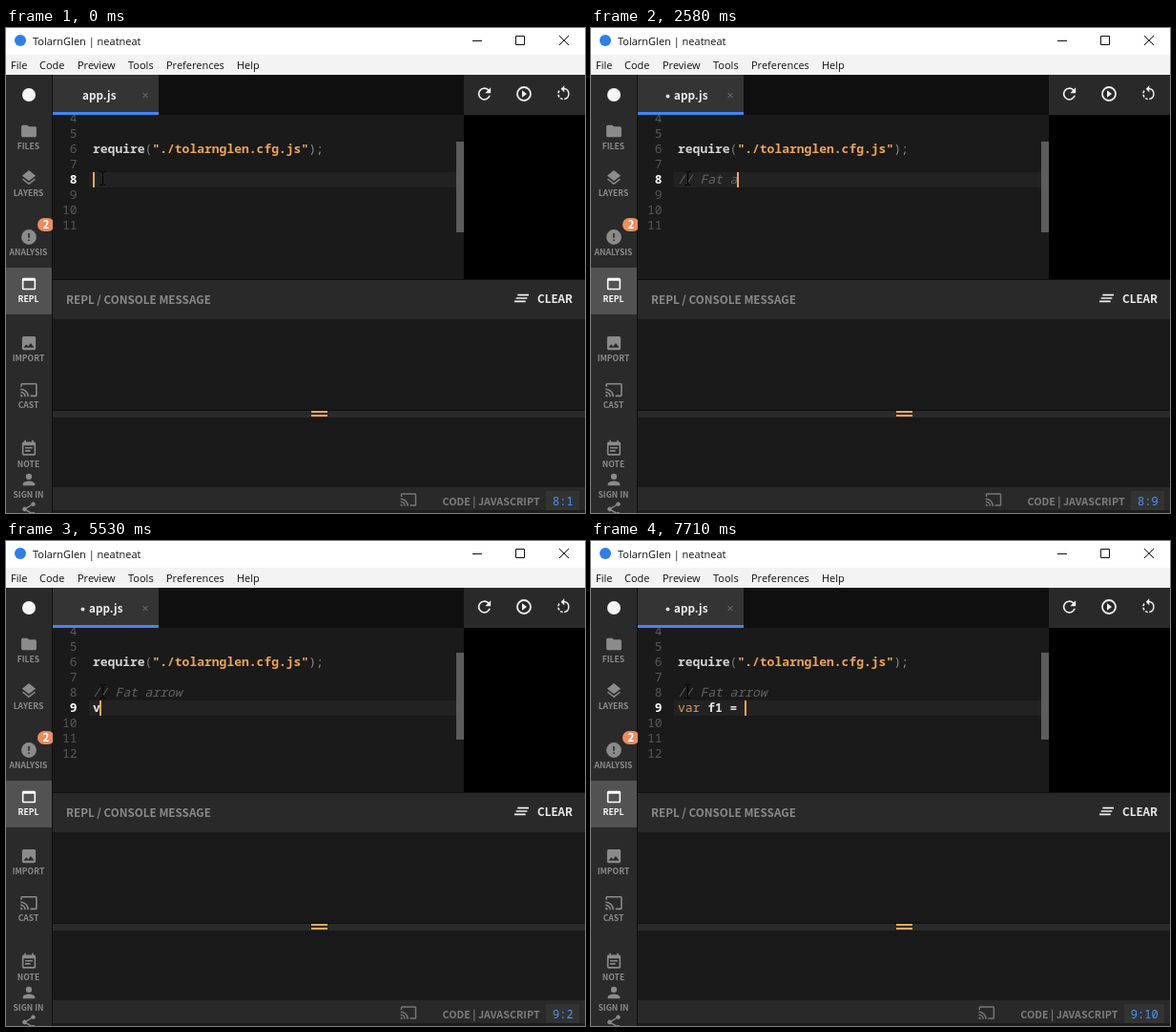
An HTML page that plays this animation: 607x508 px, repeating every 8 s.

```html
<!DOCTYPE html>
<html lang="en">
<head>
<meta charset="utf-8">
<title>Code editor</title>
<style>
html, body { margin: 0; width: 100%; height: 100%; overflow: hidden; background: #191919; }
svg { display: block; overflow: hidden; }
text { white-space: pre; }
.sys { font: 11px "Open Sans", "Noto Sans", sans-serif; fill: #111; }
.ui { font: 700 11.7px "Noto Sans CJK JP", "Noto Sans CJK SC", "Open Sans", sans-serif; }
.small { font-size: 8.6px; }
.code { font: 13px "Noto Sans Mono", "Liberation Mono", monospace; }
.list { font: 500 12px "Noto Sans Mono", "Liberation Mono", monospace; }
.note { font-size: 10.8px; }
.i { font-style: italic; }
.b { font-weight: 600; }
.mid { text-anchor: middle; }
.end { text-anchor: end; }
.shadow { filter: drop-shadow(0 18px 15px #0008); }
</style>
</head>
<body>
<svg id="stage" width="607" height="508" viewBox="0 0 607 508"></svg>
<script>
const LOOP = 8000, BLINK = 535, CHAR = 7.8, LEFT = 91;

// time, text of the edited line, autocomplete query (if the list is open)
const STEPS = [
  [-125, ""], [1060, "/"], [1270, "//"], [1490, "// "], [1700, "// F"],
  [1820, "// F", "f"], [1920, "// Fa", "f"], [2030, "// Fa", "fa"],
  [2150, "// Fat", "fa"], [2260, "// Fat", "fat"], [2370, "// Fat "],
  [2580, "// Fat a"], [2690, "// Fat a", "a"], [2800, "// Fat ar", "a"],
  [2920, "// Fat arr", "ar"], [3020, "// Fat arr", "arr"], [3130, "// Fat arro", "arr"],
  [3240, "// Fat arrow"], [3350, "// Fat arrow "],
  [3560, "// "], [4980, "/"], [5080, ""],
  [5530, "v"], [5640, "v", "v"], [5750, "va", "va"], [5860, "var", "var"],
  [5970, "var ", "var"], [6070, "var "], [6310, "var f"], [6410, "var f", "f"],
  [6640, "var f1", "f"], [6750, "var f1"], [7070, "var f1 "],
  [7500, "var f1 ="], [7710, "var f1 = "]
];
const NEWLINE = 3560, DIRTY = 1490;

// name, type, parameters
const FN = "function";
const ITEMS = [
  ["alert", FN, "(message:string) => void"],
  ["BackgroundLayer", "[class: BackgroundLayer]"],
  ["Tolarn", "[class: Tolarn]"],
  ["Layer", "[class: Layer]"],
  ["VideoLayer", "[class: VideoLayer]"],
  ["cancelAnimationFrame", FN, "(handle:number) => void"],
  ["clearTimeout", FN, "(handle:number) => void"],
  ["clearInterval", FN, "(handle:number) => void"],
  ["declare", "[flowtype: declare]"],
  ["localStorage", "Storage"],
  ["navigator", "Navigator"],
  ["parseFloat", FN, "(value:string) => number"],
  ["requestAnimationFrame", FN, "(callback:any) => number"],
  ["focus", FN, "() => void"],
  ["Infinity", "number"],
  ["isFinite", FN, "(value:number) => boolean"]
];

const ICONS = {
  folder: "M10 4H4c-1.1 0-2 .9-2 2v12c0 1.1.9 2 2 2h16c1.1 0 2-.9 2-2V8c0-1.1-.9-2-2-2h-8z",
  layers: "M12 18.5l-7.4-5.7L3 14l9 7 9-7-1.6-1.2zM12 16l9-7-9-7-9 7z",
  alert: "M12 2a10 10 0 1 0 0 20a10 10 0 0 0 0-20zm1 15h-2v-2h2zm0-4h-2V7h2z",
  panel: "M19 4H5a2 2 0 0 0-2 2v12a2 2 0 0 0 2 2h14a2 2 0 0 0 2-2V6a2 2 0 0 0-2-2zm0 14H5V8h14z",
  image: "M21 19V5a2 2 0 0 0-2-2H5a2 2 0 0 0-2 2v14a2 2 0 0 0 2 2h14a2 2 0 0 0 2-2zM8.5 13.5l2.5 3 3.5-4.5 4.5 6H5z",
  cast: "M21 3H3a2 2 0 0 0-2 2v3h2V5h18v14h-7v2h7a2 2 0 0 0 2-2V5a2 2 0 0 0-2-2zM1 18v3h3a3 3 0 0 0-3-3zm0-4v2a5 5 0 0 1 5 5h2a7 7 0 0 0-7-7zm0-4v2a9 9 0 0 1 9 9h2A11 11 0 0 0 1 10z",
  note: "M17 10H7v2h10zm2-7h-1V1h-2v2H8V1H6v2H5a2 2 0 0 0-2 2v14a2 2 0 0 0 2 2h14a2 2 0 0 0 2-2V5a2 2 0 0 0-2-2zm0 16H5V8h14zm-5-5H7v2h7z",
  person: "M12 12a4 4 0 1 0 0-8 4 4 0 0 0 0 8zm0 2c-2.7 0-8 1.3-8 4v2h16v-2c0-2.7-5.3-4-8-4z",
  share: "M18 16c-.8 0-1.4.3-2 .8l-7.1-4.2a3 3 0 0 0 0-1.4L16 7.1A3 3 0 1 0 15 5c0 .2 0 .5.1.7L8 9.8a3 3 0 1 0 0 4.4l7.1 4.2A2.9 2.9 0 1 0 18 16z",
  refresh: "M17.6 6.4A8 8 0 1 0 19.7 14h-2.1A6 6 0 1 1 16.2 7.8L13 11h7V4z",
  rotate: "M7.1 8.5L5.7 7.1A8 8 0 0 0 4.1 11h2a6 6 0 0 1 1-2.5zM6.1 13h-2a8 8 0 0 0 1.6 3.9l1.4-1.4a6 6 0 0 1-1-2.5zm1 5.3a8 8 0 0 0 3.9 1.6v-2a6 6 0 0 1-2.5-1zM13 4.1V1L8.5 5.5 13 10V6.1a6 6 0 0 1 0 11.8v2a8 8 0 0 0 0-15.8z",
  clear: "M5 13h14v-2H5zm-2 4h14v-2H3zM7 7v2h14V7z"
};

const rect = (x, y, w, h, fill, r = 0) =>
  `<rect x="${x}" y="${y}" width="${w}" height="${h}" fill="${fill}" rx="${r}"/>`;
const text = (x, y, cls, str, fill = "") =>
  `<text x="${x}" y="${y}" class="${cls}" ${fill && `fill="${fill}"`}>${str}</text>`;
const span = (str, fill, weight) =>
  `<tspan fill="${fill}" ${weight ? `font-weight="${weight}"` : ""}>${str}</tspan>`;
const line = (d, color, width = 1) =>
  `<path d="${d}" fill="none" stroke="${color}" stroke-width="${width}"/>`;
const icon = (name, cx, cy, size, fill) =>
  `<path d="${ICONS[name]}" fill="${fill}" fill-rule="evenodd"
    transform="translate(${cx - size / 2} ${cy - size / 2}) scale(${size / 24})"/>`;

function windowFrame() {
  const menu = [["File", 5], ["Code", 35], ["Preview", 75], ["Tools", 128], ["Preferences", 168], ["Help", 242]];
  return rect(0, 0, 607, 28, "#fff") + rect(0, 28, 607, 21, "#f3f3f3") +
    `<circle cx="15" cy="13" r="6" fill="#2f7fe6"/>` +
    text(28, 17.5, "sys", "TolarnGlen | neatneat") +
    menu.map(([name, x]) => text(x, 43, "sys", name)).join("") +
    line("M489 13.5h10M534.5 8.5h9v9h-9zM580 8l10 10M590 8l-10 10", "#111");
}

function sidebar() {
  const entries = [["folder", "FILES", 108], ["layers", "LAYERS", 157], ["alert", "ANALYSIS", 219],
    ["panel", "REPL", 268], ["image", "IMPORT", 330], ["cast", "CAST", 379],
    ["note", "NOTE", 440.5], ["person", "SIGN IN", 473]];
  return rect(0, 49, 48, 459, "#2a2a2a") + rect(0, 251, 48, 49, "#525252") +
    `<circle cx="24" cy="70" r="7" fill="#f5f5f5"/>` +
    entries.map(([name, label, y]) => {
      const fill = label == "REPL" ? "#fff" : "#8b8b8b";
      return icon(name, 24, y, 19, fill) + text(23.5, y + 19.3, "ui small mid", label, fill);
    }).join("") +
    icon("share", 24, 504, 18, "#8b8b8b") +
    rect(33, 199, 18, 14, "#ea8d63", 7) + text(42, 210, "ui mid", "2", "#fff");
}

function panels() {
  return rect(48, 49, 559, 459, "#0f0f0f") + rect(49, 49, 111, 42, "#343434") +
    rect(49, 88, 111, 3, "#4285f4") + line("M143.5 68l5 5M148.5 68l-5 5", "#777") +
    rect(480, 49, 127, 42, "#292929") + rect(480, 91, 127, 172, "#000") +
    icon("refresh", 501.5, 69, 20, "#f0f0f0") + icon("rotate", 584.5, 69, 19, "#f0f0f0") +
    `<circle cx="543" cy="69" r="7" fill="none" stroke="#f0f0f0" stroke-width="1.8"/>` +
    `<path d="M541 65.3v7.4l5-3.7z" fill="#f0f0f0"/>` +
    rect(49, 264, 558, 41, "#292929") + rect(49, 305, 558, 95, "#191919") +
    rect(49, 401, 558, 7, "#2a2a2a") + rect(49, 408, 558, 73, "#191919") +
    text(63, 289, "ui", "REPL / CONSOLE MESSAGE", "#8a8a8a") +
    icon("clear", 540.5, 283, 20, "#f0f0f0") + text(557, 288, "ui", "CLEAR", "#ececec") +
    rect(320, 401, 17, 2, "#eda85f") + rect(320, 405, 17, 2, "#eda85f") +
    rect(49, 481, 558, 24, "#292929") + rect(49, 505, 558, 3, "#1d1b1c");
}

// Positions of the tightest in-order match of query in name, or null
function match(name, query) {
  const low = name.toLowerCase();
  let best = null;
  for (let start = 0; start < low.length; start++) {
    if (low[start] != query[0]) continue;
    const hits = [start];
    for (const c of query.slice(1)) {
      const at = low.indexOf(c, hits[hits.length - 1] + 1);
      if (at < 0) { hits.length = 0; break; }
      hits.push(at);
    }
    const size = h => h[h.length - 1] - h[0];
    if (hits.length && (!best || size(hits) < size(best))) best = hits;
  }
  return best;
}

function popup(query, x, y) {
  const rows = ITEMS.map(item => [item, match(item[0], query)]).filter(row => row[1]);
  const full = rows.length * 28, height = Math.min(full, 320);
  const right = full > height ? 465 : 473;
  const body = rows.map(([[name, type, params = ""], hits], i) => {
    const first = i == 0, base = i * 28 + 18.3;
    const label = [...name].map((c, k) => span(c, hits.includes(k) ? "#f2b632" : "#f0f0f0")).join("");
    const tint = type == FN ? "#f5b01e" : first ? "#f4f7ff" : "#80a8f5";
    return (first ? rect(0, 0, 480, 28, "#2962ff") : "") +
      text(7.5, base, "list b", label) +
      text(10.5 + name.length * 7.2, base, "list note", params, first ? "#a4c1ff" : "#80a8f5") +
      text(right, base, first && type != FN ? "list b end" : "list end", type, tint);
  }).join("");
  return `<g class="shadow"><svg x="${x}" y="${y}" width="480" height="${height}">` +
    rect(0, 0, 480, height, "#252525") + body + `</svg></g>`;
}

function codeLine(str, y) {
  if (str.startsWith("/")) return text(LEFT, y, "code i", str, "#626262");
  const isVar = str.startsWith("var");
  return text(LEFT, y, "code b", isVar ? span("var", "#dd9a58", 400) + str.slice(3) : str, "#e4e4e4");
}

function editor(t, str, caret) {
  const below = t >= NEWLINE, row = below ? 9 : 8;
  const base = n => 131 + (n - 6) * 16, top = base(row) + 4 - 16;
  let out = rect(49, 91, 431, 172, "#1a1a1a") + rect(87, top, 385, 16, "#222");
  for (let n = 4; n <= row + 3; n++)
    out += text(74.5, base(n), "code end" + (n == row ? " b" : ""), n, n == row ? "#fff" : "#585858");
  out += text(LEFT, base(6), "code b", span("require", "#d4d4d4") + span("(", "#777", 400) +
    span('"./tolarnglen.cfg.js"', "#e9a55d") + span(");", "#888", 400));
  if (t >= 5970 && t < 6070) out += rect(LEFT, top, 24, 16, "#3d3d3d");
  if (below) out += codeLine("// Fat arrow", base(8));
  out += codeLine(str, base(row));
  if (caret) out += rect(Math.floor(LEFT + str.length * CHAR), top, 2, 16, "#f2a65a");
  out += below ? rect(472, 117, 8, 91, "#5c5c5c") : rect(472, 119, 8, 95, "#5c5c5c");
  return `<svg y="91" width="480" height="172" viewBox="0 91 480 172">${out}</svg>`;
}

function status(label) {
  const x = 594.6 - label.length * 7.2;
  return icon("cast", x - 151, 494, 18, "#777") +
    text(x - 13.3, 500, "ui note end", "CODE | JAVASCRIPT", "#7c7c7c") +
    rect(x - 7, 485, 608 - x, 20, "#333") + text(x, 500, "list", label, "#4b96fb");
}

function dynamic(t, [, str, query], caret) {
  const row = t >= NEWLINE ? 9 : 8;
  const lag = t >= 5970 && t < 6070 ? 0 : 1;
  const word = str.trimEnd().search(/\w+$/);
  return (t >= DIRTY
      ? `<circle cx="80.5" cy="71.5" r="2" fill="#ddd"/>` + text(87, 75, "ui", "app.js", "#eee")
      : text(80, 75, "ui", "app.js", "#eee")) +
    editor(t, str, caret) + status(`${row}:${str.length + lag}`) +
    (query ? popup(query, LEFT + word * 8, row * 16 + 39) : "") +
    line("M98.5 150.5h2l1 1 1-1h2M101.5 151v13M98.5 164.5h2l1-1 1 1h2", "#000");
}

const stage = document.getElementById("stage");
stage.innerHTML = windowFrame() + panels() + sidebar() + "<g></g>";
const layer = stage.lastElementChild;
let shown = "";

function frame(now) {
  const t = now % LOOP;
  const i = STEPS.findLastIndex(step => step[0] <= t);
  const caret = Math.floor((t - STEPS[i][0]) / BLINK) % 2 == 0;
  const key = i + "/" + caret;
  if (key != shown) {
    layer.innerHTML = dynamic(t, STEPS[i], caret);
    shown = key;
  }
}

const start = performance.now();
function tick() {
  frame(performance.now() - start);
  requestAnimationFrame(tick);
}
tick();
</script>
</body>
</html>
```
